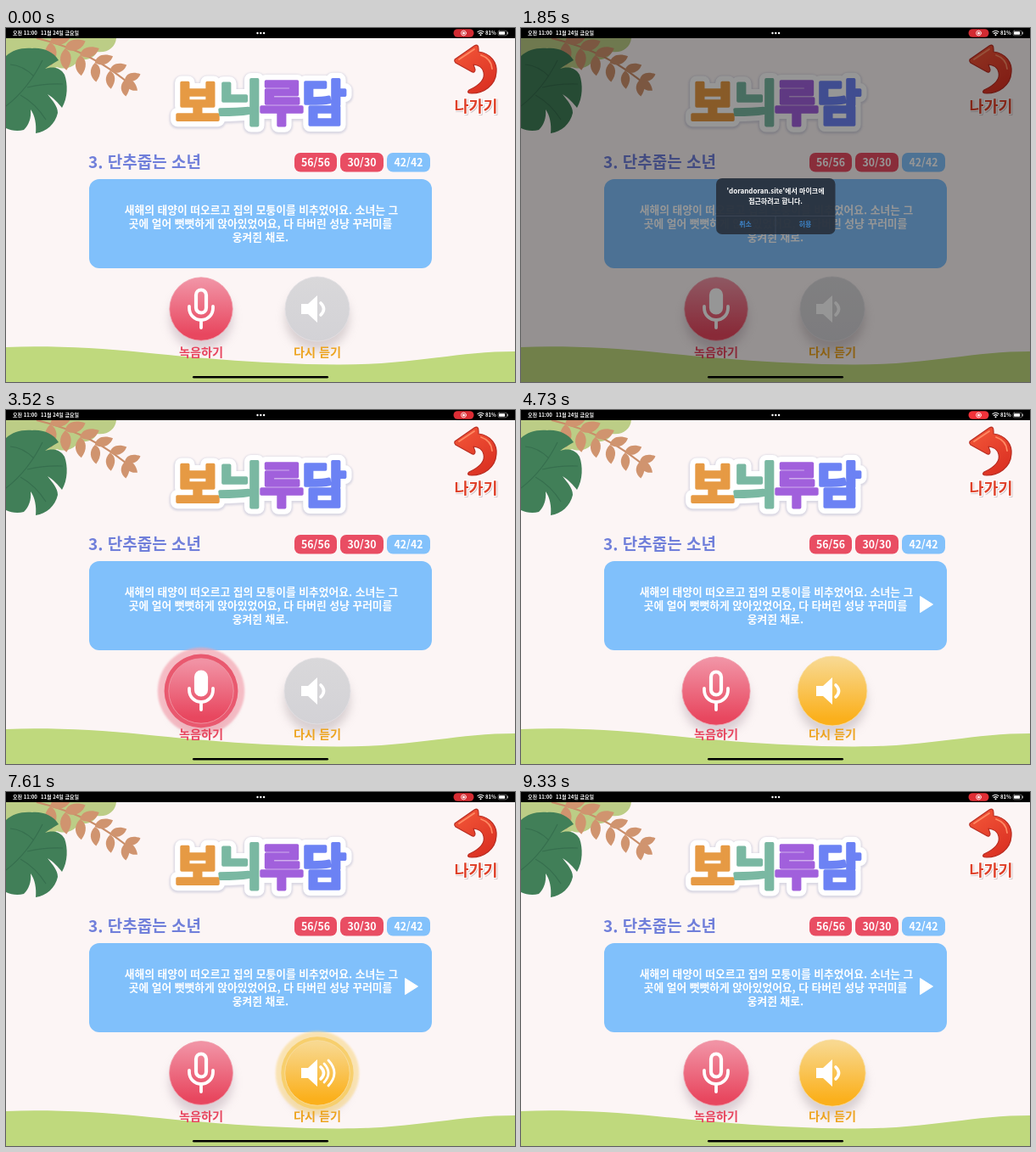
Animation, 600 px wide and 417 px high, one loop 9.36 s. Source, as an HTML page:

```html
<!DOCTYPE html>
<html lang="ko">
<head>
<meta charset="utf-8">
<style>
html, body { margin: 0; width: 100%; height: 100%; overflow: hidden; background: #fcf5f5; }
svg { display: block; width: 100vw; height: 100vh; }
text { font-family: "Noto Sans CJK KR", "Noto Sans CJK JP", "Noto Sans CJK", sans-serif; font-weight: 700; }
.mid { text-anchor: middle; }
.heavy { font-weight: 900; }
.line { fill: none; stroke: #fff; stroke-linecap: round; }
</style>
</head>
<body>
<svg viewBox="0 0 600 417">
  <defs>
    <linearGradient id="pink" x2="0" y2="1"><stop offset=".05" stop-color="#f192a4"/><stop offset=".9" stop-color="#e8475f"/></linearGradient>
    <linearGradient id="gold" x2="0" y2="1"><stop offset=".05" stop-color="#f8d88f"/><stop offset=".9" stop-color="#fbb01c"/></linearGradient>
    <linearGradient id="gray" x2="0" y2="1"><stop offset="0" stop-color="#d9d8da"/><stop offset="1" stop-color="#d3d2d6"/></linearGradient>
    <linearGradient id="red" x2=".6" y2="1"><stop offset="0" stop-color="#f4593a"/><stop offset="1" stop-color="#dc3223"/></linearGradient>
    <filter id="soft" x="-40%" y="-40%" width="180%" height="180%"><feGaussianBlur stdDeviation="5.5"/></filter>
    <filter id="edge" x="-20%" y="-20%" width="140%" height="140%"><feGaussianBlur stdDeviation="1.2"/></filter>
    <g id="logo" class="mid" font-size="57" stroke-linejoin="round">
      <text x="226" y="108.5" color="#e69a44" fill="currentColor">보</text>
      <text x="276" y="108.5" color="#7ab8a2" fill="currentColor">늬</text>
      <text x="325" y="108.5" color="#a160dc" fill="currentColor">루</text>
      <text x="375" y="108.5" color="#6c82f4" fill="currentColor">담</text>
    </g>
    <path id="leaf" d="M0 0C3-9 13-11 24-5C19 4 9 7 0 0Z"/>
    <clipPath id="page"><path d="M0 12H600V417H0Z"/></clipPath>
  </defs>

  <rect width="600" height="417" fill="#fcf5f5"/>

  <g clip-path="url(#page)">
    <path d="M0 12H130C129 23 119 30 107 28C104 36 94 39 86 36C82 46 70 50 60 46C44 56 16 56 0 46Z" fill="#bccd86"/>
    <path d="M36 12Q104 28 150 70" fill="none" stroke="#c98d69" stroke-width="2.2"/>
    <g id="twig" fill="#d0946f"></g>
    <path d="M0 33C8 26 18 23 31 24C44 23 56 28 62 38C57 41 51 44 46 48C54 45 64 46 69 55C73 66 73 82 66 94C62 89 56 82 49 78C55 86 61 92 61 100C58 113 48 122 35 124C36 113 34 103 29 96C30 106 27 114 21 120C14 122 6 121 0 118Z" fill="#417f58"/>
    <path d="M0 92Q26 72 43 38M25 70Q46 65 67 66M17 79Q35 89 47 108M33 57Q20 44 5 43" fill="none" stroke="#366f4e" stroke-width="1.2"/>
    <path d="M0 376C50 374 110 377 160 382S300 396 390 396.5S530 381 600 381V417H0Z" fill="#bfd97d"/>
  </g>

  <use href="#logo" stroke="#dad8e3" stroke-width="19" y="1.5" filter="url(#edge)"/>
  <use href="#logo" stroke="#fff" stroke-width="16"/>
  <use href="#logo" stroke="currentColor" stroke-width="3.6"/>

  <path d="M529 37L552 21Q557 18 557 25V28C572 30 579 41 578 52C577 68 563 77 549 77Q542 77 546 73C559 67 565 60 563 52Q561 44 551 43L553 49Q553 54 548 51L530 41Q528 39 529 37Z" fill="url(#red)" stroke="#b92d22" stroke-width="1.2" stroke-linejoin="round"/>
  <path d="M534 37L552 25M560 32Q572 36 573 48" class="line" style="stroke:#ff8a64" stroke-width="1.8"/>
  <g class="mid heavy" font-size="18.5" stroke-linejoin="round">
    <text x="555" y="100" fill="#cfc0c3" stroke="#cfc0c3" stroke-width="2">나가기</text>
    <text x="554" y="99" fill="#df4029" stroke="#fff" stroke-width="2.5" paint-order="stroke">나가기</text>
  </g>

  <text x="97" y="164.5" font-size="19" fill="#707fda">3. 단추줍는 소년</text>
  <g class="mid" font-size="12.3" fill="#fff">
    <rect x="340" y="147" width="50" height="22.5" rx="7" fill="#e94d63"/><text x="365" y="162.5">56/56</text>
    <rect x="394" y="147" width="51" height="22.5" rx="7" fill="#e94d63"/><text x="419.5" y="162.5">30/30</text>
    <rect x="449" y="147" width="51" height="22.5" rx="7" fill="#82c1fb"/><text x="474.5" y="162.5">42/42</text>
    <rect x="98" y="178" width="404" height="105" rx="12" fill="#80c0fb"/>
    <g font-size="12.75">
      <text x="301" y="219">새해의 태양이 떠오르고 집의 모퉁이를 비추었어요. 소녀는 그</text>
      <text x="300" y="235">곳에 얼어 뻣뻣하게 앉아있었어요, 다 타버린 성냥 꾸러미를</text>
      <text x="300" y="251">웅켜쥔 채로.</text>
    </g>
    <path id="next" d="M470.5 219.5L485.5 229L470.5 238.5Z" stroke="#fff" stroke-linejoin="round"/>
  </g>

  <g id="mic" transform="translate(230 331)">
    <circle class="shade" cy="11" fill="#b9a7b2" opacity=".5" filter="url(#soft)"/>
    <circle class="ring" fill="#f3a5b1" opacity=".7" filter="url(#edge)"/>
    <circle class="rim" fill="#e9596f"/>
    <circle class="disc" fill="url(#pink)" stroke="#f0a0ad" stroke-width=".8"/>
    <rect id="capsule" x="-6" y="-22.5" width="12" height="27" rx="6" stroke="#fff" stroke-width="4.2"/>
    <path class="line" d="M-14-3V-1A14 14 0 0 0 14-1V-3M0 13V22" stroke-width="3.8"/>
  </g>
  <g id="speaker" transform="translate(367 331)">
    <circle class="shade" cy="11" fill="#b5aaae" opacity=".5" filter="url(#soft)"/>
    <circle class="ring" fill="#f9dc98" opacity=".7" filter="url(#edge)"/>
    <circle class="rim" fill="#f7cf6d"/>
    <circle class="disc" stroke-width=".8"/>
    <path d="M-19-6H-11L0-16V16L-11 6H-19Z" fill="#fff"/>
    <path class="line" d="M4-7Q11 0 4 7" stroke-width="3.6"/>
    <path id="waves" class="line" d="M8-11Q18 0 8 11M13-15Q27 0 13 15" stroke-width="2.8"/>
  </g>
  <g class="mid" font-size="14.2">
    <text x="230" y="386.8" fill="#e7465f">녹음하기</text>
    <text x="367" y="386.8" fill="#eda420">다시 듣기</text>
  </g>
  <rect x="220" y="410" width="160" height="2.6" rx="1.3"/>

  <g id="alert" class="mid" font-size="8" fill="#fff">
    <rect y="12" width="600" height="405" fill="#000" opacity=".41"/>
    <rect x="230" y="177" width="140.5" height="66" rx="7" fill="#29323f" opacity=".95"/>
    <path d="M230 221.5H370M300 221.5V243" stroke="#46505e" stroke-width=".6"/>
    <text x="300" y="194.5">'dorandoran.site'에서 마이크에</text>
    <text x="300" y="206.5">접근하려고 합니다.</text>
    <g fill="#3d83c6"><text x="264.5" y="234">취소</text><text x="335" y="234">허용</text></g>
  </g>

  <rect width="600" height="12"/>
  <g font-size="6" fill="#fff">
    <text x="8" y="8.2">오전 11:00</text>
    <text x="41" y="8.2">11월 24일 금요일</text>
    <circle cx="296.5" cy="6" r="1.2"/><circle cx="300.3" cy="6" r="1.2"/><circle cx="304.1" cy="6" r="1.2"/>
    <rect id="pill" x="527.5" y="1.2" width="24" height="9.6" rx="4.8" fill="#f5323a"/>
    <circle cx="539.5" cy="6" r="2.9" class="line" stroke-width=".8"/><circle cx="539.5" cy="6" r="1.5"/>
    <path class="line" d="M556 4.7Q559.5 1.7 563 4.7M557.4 6.5Q559.5 4.7 561.6 6.5" stroke-width="1.1"/><circle cx="559.5" cy="8.2" r="1"/>
    <text x="565" y="8.2">81%</text>
    <rect x="580" y="3.2" width="10.5" height="5.6" rx="1.6" class="line" style="stroke:#999" stroke-width=".6"/>
    <rect x="581" y="4.2" width="7.2" height="3.6" rx=".8"/><path d="M591.3 5V7" class="line" stroke-width=".8"/>
  </g>
</svg>
<script>
const LOOP = 9360, BEAT = 1950;
const ASK = 970, RECORD = 1950, RECORDED = 4250, PLAY = 6900, PLAYED = 8600;
const $ = s => document.querySelector(s);
const clamp = v => Math.max(0, Math.min(1, v));
const wave = t => (1 - Math.cos(2 * Math.PI * t / BEAT)) / 2;
const show = (s, on) => $(s).style.display = on ? '' : 'none';

// leaflets in pairs along the twig, shrinking towards the tip
for (let i = 0; i < 6; i++) {
  const u = i / 5, x = 52 + 88 * u, y = 17 + 34 * u + 10 * u * u;
  for (const turn of i < 5 ? [-8, 98] : [-8, 98, 52])
    $('#twig').innerHTML += `<use href="#leaf" transform="translate(${x} ${y}) rotate(${turn}) scale(${1.1 - 0.3 * u})"/>`;
}

function resize(id, r, active, spread) {
  const radii = { disc: r, shade: r, rim: r + spread * 0.4, ring: r + spread };
  for (const part in radii) $(`${id} .${part}`).setAttribute('r', radii[part]);
  show(id + ' .rim', active);
  show(id + ' .ring', active);
}

function draw(t) {
  const recording = t >= RECORD && t < RECORDED;
  const ready = t >= RECORDED;
  const playing = t >= PLAY && t < PLAYED;
  const r = 37.2 + 3.1 * wave(t);

  resize('#mic', r, recording, 13);
  resize('#speaker', r + 0.8, playing, 11);
  $('#capsule').setAttribute('fill', t >= ASK && t < RECORDED ? '#fff' : 'none');

  const disc = $('#speaker .disc');
  disc.setAttribute('fill', ready ? 'url(#gold)' : 'url(#gray)');
  disc.setAttribute('stroke', ready ? '#f8dfa8' : '#e2e0e4');
  show('#waves', playing);
  show('#next', ready);

  const alpha = clamp((t - ASK) / 110) * clamp((RECORD + 130 - t) / 130);
  $('#alert').setAttribute('opacity', alpha);
  $('#pill').setAttribute('opacity', 0.86 + 0.14 * wave(t));
}

function tick() {
  draw(performance.now() % LOOP);
  requestAnimationFrame(tick);
}
tick();
</script>
</body>
</html>
```
